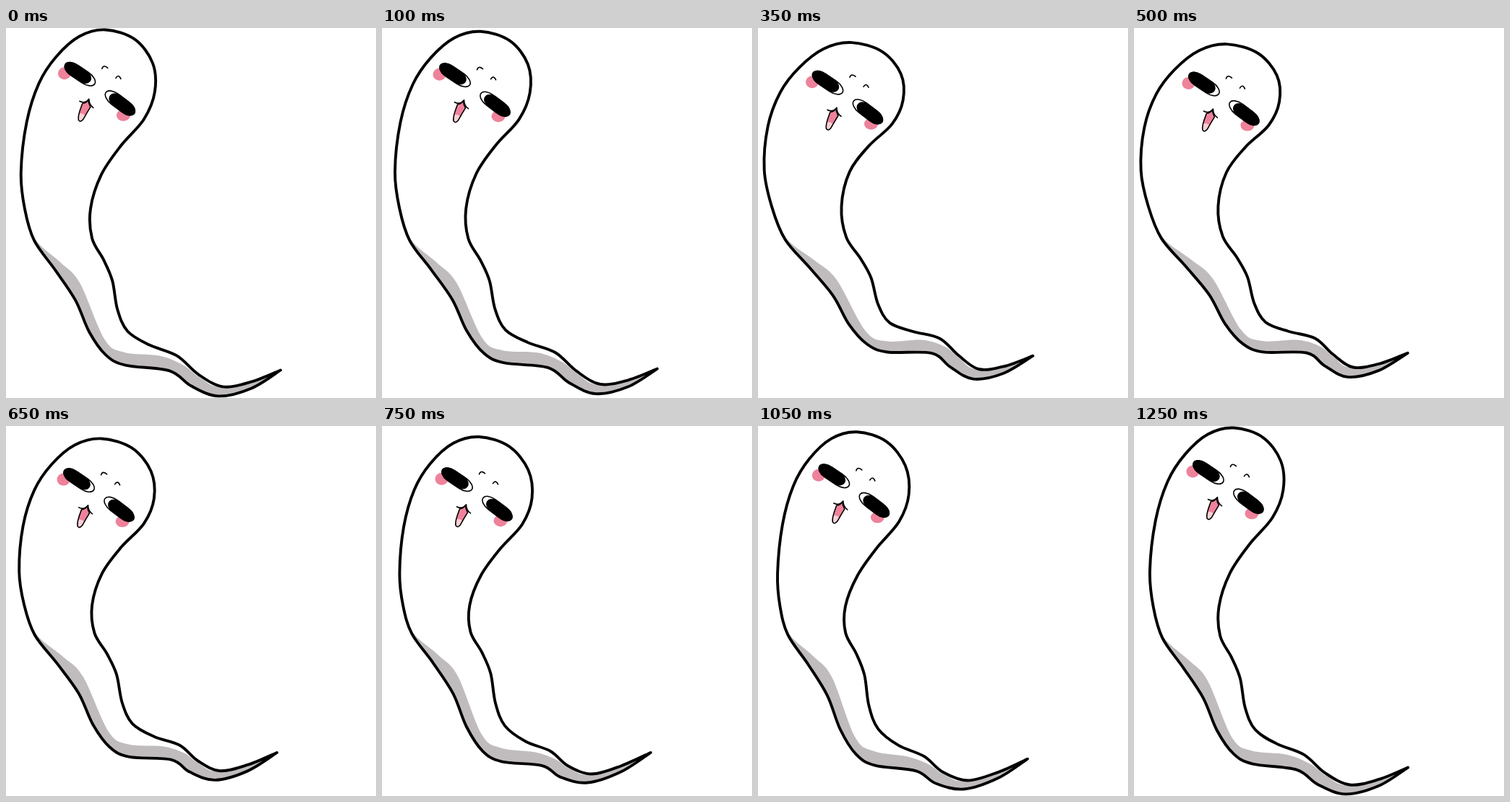
Recreate the animation shown at these times as an HTML page with a canvas. Size 512 by 512 pixels, loop 1300 ms.

```html
<!DOCTYPE html>
<html lang="en">
<head>
<meta charset="utf-8">
<title>Swaying ghost</title>
<style>
html, body { margin: 0; height: 100%; overflow: hidden; background: #fff; }
canvas { display: block; }
</style>
</head>
<body>
<canvas id="stage" width="512" height="512"></canvas>
<script>
const ctx = document.getElementById('stage').getContext('2d');
const LOOP = 1300, STEP = 50;
const PINK = '#ee829b';

// Resting pose: from the tail tip up the right side, over the head, down the left side
const tip = [380, 474];
const outline = [
  tip, [340, 490], [300, 497], [266, 480], [236, 454], [198, 439], [168, 420], [154, 390],
  [147, 350], [135, 321], [119, 291], [117, 250], [132, 203], [159, 163], [191, 126],
  [206, 88], [203, 48], [178, 15], [138, 2], [102, 11], [70, 39], [46, 76], [29, 130],
  [21, 200], [26, 250], [39, 294], [68, 335], [96, 377], [115, 421], [138, 453],
  [165, 467], [226, 475], [256, 496], [294, 510], [340, 499], tip
];
const shadeEdge = [
  [25, 250], [41, 293], [76, 325], [102, 353], [136, 431], [163, 449],
  [212, 454], [245, 467], [268, 484], [300, 497], tip
];

// How far each lean moves the body, at every 100 px from head to tail
const leanLeft = { x: [-17, -17, -12.5, -3, 3, 2.5, -8, -24], y: [19, 11.5, -3, -2.5, -9, -21, -27, -22], stretch: .06 };
const leanRight = { x: [-2, 4, 7.5, 3, 0, -5, -14, -10], y: [11, 11, 6, -8, -5, 3, -6, -22], stretch: 0 };

// Smooth pulse centred at a moment of the loop
function pulse(t, centre, width) {
  const half = LOOP / 2;
  const d = (t - centre + half + LOOP) % LOOP - half;
  return Math.exp(-((d / width) ** 2));
}

// Catmull-Rom value at position u in a list
function sample(list, u) {
  const i = Math.min(Math.floor(u), list.length - 2), f = u - i;
  const q = list[i], r = list[i + 1], p = list[i - 1] ?? q, s = list[i + 2] ?? r;
  return q + f / 2 * (r - p + f * (2 * p - 5 * q + 4 * r - s + f * (3 * (q - r) + s - p)));
}

function bend([x, y], left, right) {
  const along = (y + (y > 300 ? Math.max(0, x - 160) : 0)) / 100;
  const shift = (lean, axis) => sample(lean[axis], along) + (axis === 'x' ? lean.stretch * x : 0);
  return [
    x + left * shift(leanLeft, 'x') + right * shift(leanRight, 'x'),
    y + left * shift(leanLeft, 'y') + right * shift(leanRight, 'y')
  ];
}

function curve(pts) {
  const path = new Path2D();
  path.moveTo(...pts[0]);
  for (let i = 0; i < pts.length - 1; i++) {
    const q = pts[i], r = pts[i + 1], p = pts[i - 1] || q, s = pts[i + 2] || r;
    path.bezierCurveTo(
      q[0] + (r[0] - p[0]) / 6, q[1] + (r[1] - p[1]) / 6,
      r[0] - (s[0] - q[0]) / 6, r[1] - (s[1] - q[1]) / 6, r[0], r[1]);
  }
  return path;
}

function drawBody(left, right) {
  const bent = pts => curve(pts.map(p => bend(p, left, right)));
  const body = bent(outline), shade = bent(shadeEdge);
  body.closePath();
  shade.lineTo(380, 520);
  shade.lineTo(0, 520);
  shade.lineTo(0, 260);

  ctx.save();
  ctx.clip(body);
  ctx.fillStyle = '#c0bcbd';
  ctx.fill(shade);
  ctx.restore();
  ctx.lineWidth = 3.9;
  ctx.stroke(body);
}

function ellipse(x, y, rx, ry, color) {
  ctx.beginPath();
  ctx.ellipse(x, y, rx, ry, 0, 0, 2 * Math.PI);
  ctx.fillStyle = color;
  ctx.fill();
}

function lens(x, halfWidth, halfHeight, corner, color) {
  ctx.beginPath();
  ctx.roundRect(x - halfWidth, -halfHeight, 2 * halfWidth, 2 * halfHeight, { x: corner, y: halfHeight });
  ctx.fillStyle = color;
  ctx.fill();
}

function drawEye(x, y, degrees, look) {
  ctx.save();
  ctx.translate(x, y);
  ctx.rotate(degrees * Math.PI / 180);
  lens(0, 24.5, 8.5, 16, '#fff');
  ctx.stroke();
  lens(look, 21, 9, 12, '#000');
  ctx.restore();
}

const mouth = new Path2D('M106 104C103 112 99 121 100.5 127Q103 131 107 126Q112 117 117 109Q114 104 114 99Q111 104 106 104Z');
const lips = new Path2D('M102 101Q110 105 115 98Q115 106 121 110');
const brows = new Path2D('M133 56Q135 50 141 55M152 69Q156 63 159 70');

function drawFace(left, right) {
  ctx.save();
  ctx.translate(-5.5 * left + 3.5 * right, 13 * left + 9.7 * right);
  ctx.lineWidth = 1.6;
  ellipse(81, 62.5, 9, 8.5, PINK);
  ellipse(162.5, 120.5, 9.5, 8, PINK);
  drawEye(102.5, 63.5, 34, -3.5);
  drawEye(158, 103.5, 37, 3.5);

  ctx.fillStyle = PINK;
  ctx.fill(mouth);
  ctx.save();
  ctx.clip(mouth);
  ellipse(103, 126, 9, 8, '#fbd0d5');
  ctx.restore();
  for (const line of [mouth, lips, brows]) ctx.stroke(line);
  ctx.restore();
}

function draw(now) {
  const t = Math.floor(now % LOOP / STEP) * STEP;
  const left = 1.2 * pulse(t, 430, 275) - .08;
  const right = 1.17 * pulse(t, 885, 290) - .15;
  ctx.fillStyle = '#fff';
  ctx.fillRect(0, 0, 512, 512);
  ctx.strokeStyle = '#000';
  ctx.lineCap = ctx.lineJoin = 'round';
  drawBody(left, right);
  drawFace(left, right);
}

const start = performance.now();
function loop() {
  draw(performance.now() - start);
  requestAnimationFrame(loop);
}
loop();
</script>
</body>
</html>
```
